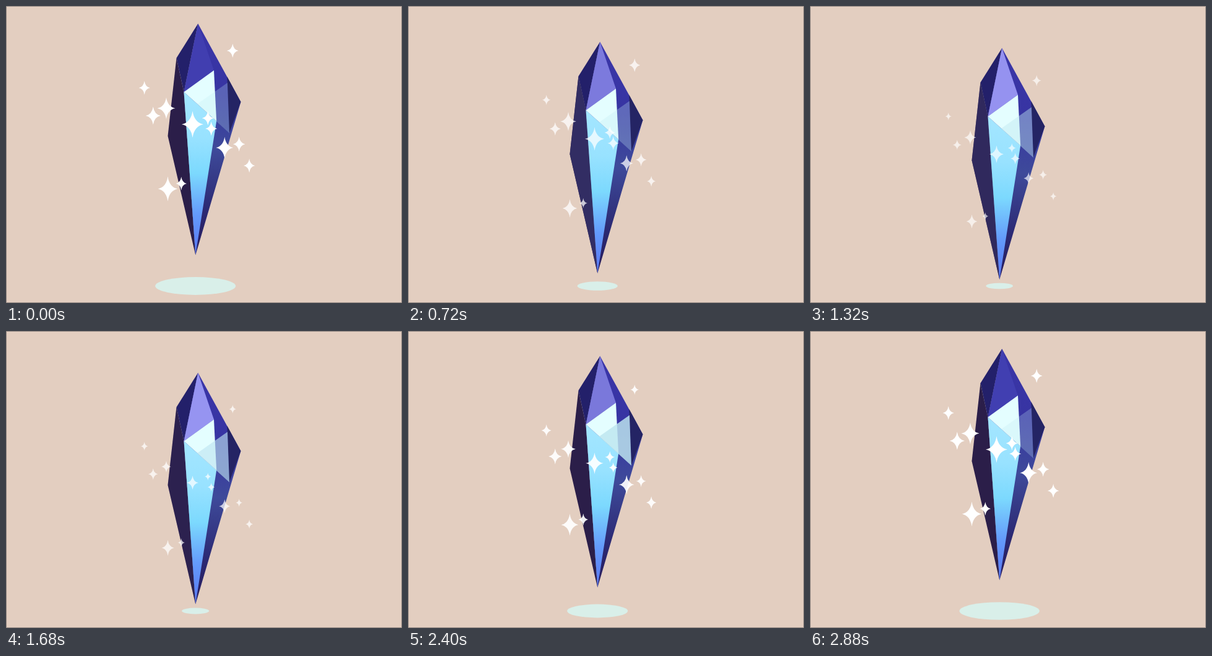
Write an HTML page that moves like this. It is 640x480 px and loops after 2.92 s.

```html
<!DOCTYPE html>
<html lang="en">
<head>
<meta charset="utf-8">
<title>Floating crystal</title>
<style>
  html, body { margin: 0; width: 100%; height: 100%; overflow: hidden; background: #e3cec0; }
  svg { display: block; width: 100vw; height: 100vh; }
</style>
</head>
<body>
<svg viewBox="0 0 640 480">
  <defs>
    <linearGradient id="beam" gradientUnits="userSpaceOnUse" x1="0" y1="139" x2="0" y2="402">
      <stop offset="0" stop-color="#a4e6ff"/>
      <stop offset=".28" stop-color="#98e2ff"/>
      <stop offset=".5" stop-color="#7cd9fe"/>
      <stop offset=".75" stop-color="#649bfb"/>
      <stop offset="1" stop-color="#5876f2"/>
    </linearGradient>
    <linearGradient id="side" gradientUnits="userSpaceOnUse" x1="0" y1="29" x2="0" y2="402">
      <stop offset="0" stop-color="#3a35a8"/>
      <stop offset=".3" stop-color="#3734a2"/>
      <stop offset=".54" stop-color="#3e4a9a"/>
      <stop offset=".8" stop-color="#2c2a74"/>
      <stop offset="1" stop-color="#271c5c"/>
    </linearGradient>
  </defs>
  <rect width="640" height="480" fill="#e3cec0"/>
  <ellipse id="shadow" cx="306.2" cy="452.5" fill="#d9efe9"/>
  <g id="crystal">
    <path fill="url(#side)" d="M310.3 28.5 379.5 155 306.3 402.5 287.5 139Z"/>
    <path fill="#242464" d="M357.3 114 379.5 155 361 205Z"/>
    <path fill="#2b1e49" d="M275.5 84 261.5 210 306.3 402.5 287.5 139Z"/>
    <path id="leftGlow" fill="#343068" d="M275.5 84 261.5 210 306.3 402.5 287.5 139Z"/>
    <path fill="#23206a" d="M310.3 28.5 275.5 84 287.5 139Z"/>
    <path fill="#413eb0" d="M310.3 28.5 287.5 139 336 104Z"/>
    <path id="topGlow" fill="#9694f1" d="M310.3 28.5 287.5 139 336 104Z"/>
    <path fill="url(#beam)" d="M287.5 139 340.2 186 306.3 402.5Z"/>
    <path fill="#e4feff" d="M287.5 139 336 104 340.2 186Z"/>
    <path id="rightGlow" fill="#bfe6f0" d="M358 124 361 205.5 309 158.5Z"/>
  </g>
  <g id="stars" fill="#fff"></g>
  <rect x=".5" y=".5" width="639" height="479" fill="none" stroke="#8b817d"/>
</svg>
<script>
const LOOP = 2920, STEP = 40;
const coarse = [0, 400, 1040, 1680, 2000, 2400, LOOP];
const fine = [0, 200, 400, 560, 1040, 1360, 1680, 2000, 2240, 2400, 2800, LOOP];

// Smooth curve through the given points, at rest at both ends.
function track(times, values) {
  const last = times.length - 1;
  const rate = i => (values[i + 1] - values[i]) / (times[i + 1] - times[i]);
  const slopes = values.map((_, i) => {
    if (i === 0 || i === last) return 0;
    const before = times[i] - times[i - 1], after = times[i + 1] - times[i];
    return (rate(i - 1) * after + rate(i) * before) / (before + after);
  });
  return t => {
    let i = 0;
    while (i < last - 1 && t >= times[i + 1]) i++;
    const span = times[i + 1] - times[i], u = (t - times[i]) / span, v = 1 - u;
    return values[i] * v * v * (1 + 2 * u) + values[i + 1] * u * u * (3 - 2 * u)
      + span * u * v * (slopes[i] * v - slopes[i + 1] * u);
  };
}
const loopTrack = (rest, ...middle) => track(coarse, [rest, ...middle, rest]);

const crystalDrop = track(fine, [0, 7.8, 17.5, 24, 37, 39.6, 39, 32, 21.5, 12, .9, 0]);
const shadowWidth = track(fine, [65, 56, 45.5, 38.5, 24.3, 21.6, 22, 28.5, 39.5, 49, 63, 65]);
const glows = {
  topGlow: loopTrack(0, .4, .92, 1, 1, .68),
  leftGlow: loopTrack(0, .6, .9, .2, 0, 0),
  rightGlow: loopTrack(.26, .28, .34, .62, .75, .83)
};
const starOpacity = loopTrack(1, .86, .66, .73, .8, .92);
const drift = {
  low: loopTrack(0, 16.7, 44.5, 55, 43.7, 17.7),
  right: loopTrack(0, 10.3, 40.3, 54.3, 47.3, 19.3),
  mid: loopTrack(0, 8.5, 39, 54, 50, 22.5),
  left: loopTrack(0, 6.5, 37.5, 54, 52, 25.5),
  far: loopTrack(0, 5, 36, 54, 54, 28.5)
};
const twinkle = {
  early: loopTrack(1, .93, .57, .64, .74, .88),
  even: loopTrack(1, .95, .79, .53, .63, .81),
  late: loopTrack(1, .97, .92, .6, .5, .72)
};

// x, y, half width, half height, drift, twinkle
const stars = [
  [223.7, 132.3, 9, 11, "far", "early"],
  [259, 165.3, 14.5, 17.5, "left", "even"],
  [237.8, 177.2, 12, 14.5, "left", "early"],
  [301.5, 191.3, 17.5, 21.5, "mid", "even"],
  [326.3, 181.3, 9.5, 11.5, "mid", "even"],
  [331.7, 198.3, 9.5, 11.5, "mid", "late"],
  [353.3, 229, 14, 17.5, "right", "early"],
  [376.7, 223.3, 9.7, 12, "right", "even"],
  [393.2, 258, 9.2, 11.3, "right", "early"],
  [261.5, 295.5, 15.7, 20, "low", "early"],
  [283.3, 287, 8.7, 11, "low", "early"],
  [366.3, 72.3, 9.3, 11.3, "mid", "late"]
].map(([x, y, w, h, move, pulse]) => {
  const node = document.createElementNS("http://www.w3.org/2000/svg", "path");
  const a = w * .15, b = h * .15;
  node.setAttribute("d",
    `M0 ${-h}Q${a} ${-b} ${w} 0Q${a} ${b} 0 ${h}Q${-a} ${b} ${-w} 0Q${-a} ${-b} 0 ${-h}Z`);
  document.getElementById("stars").append(node);
  return { node, x, y, drop: drift[move], scale: twinkle[pulse] };
});

const byId = id => document.getElementById(id);
const crystal = byId("crystal"), shadow = byId("shadow"), starGroup = byId("stars");

function draw(t) {
  crystal.setAttribute("transform", `translate(0 ${crystalDrop(t)})`);
  const rx = shadowWidth(t);
  shadow.setAttribute("rx", rx);
  shadow.setAttribute("ry", rx * .222);
  for (const id in glows) byId(id).setAttribute("opacity", glows[id](t));
  starGroup.setAttribute("fill-opacity", starOpacity(t));
  for (const { node, x, y, drop, scale } of stars)
    node.setAttribute("transform", `translate(${x} ${y + drop(t)}) scale(${scale(t)})`);
}

let start;
function tick(now) {
  start ??= now;
  draw(Math.floor((now - start) % LOOP / STEP) * STEP);
  requestAnimationFrame(tick);
}
draw(0);
requestAnimationFrame(tick);
</script>
</body>
</html>
```
